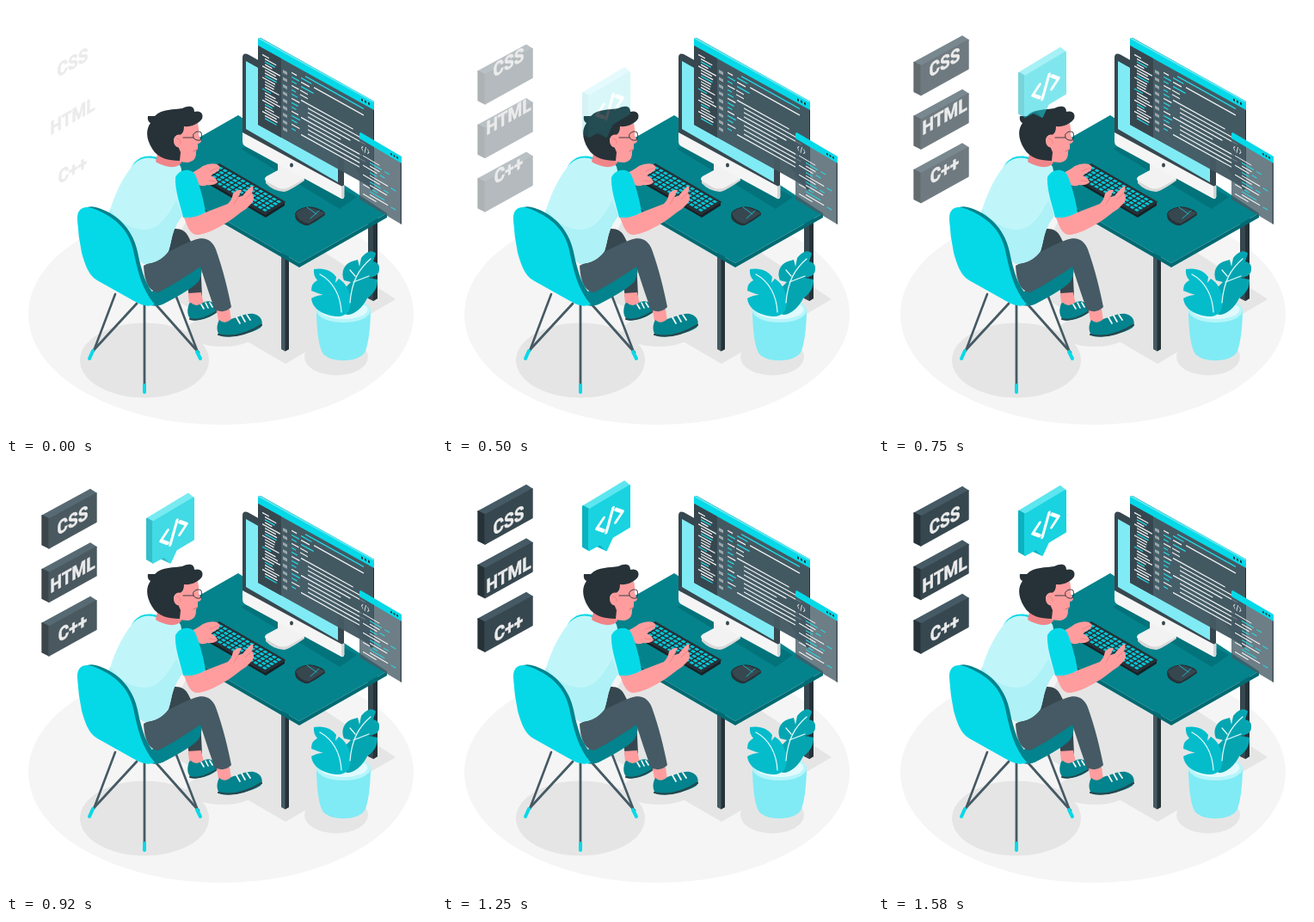
Write an HTML page that moves like this. It is 500 px wide and 500 px high and loops after 1620 ms.

```html
<!DOCTYPE html>
<html lang="en">
<head>
<meta charset="utf-8">
<title>Developer at work</title>
<style>
html, body { margin: 0; width: 100%; height: 100%; overflow: hidden; background: #fff; }
svg { display: block; width: 100%; height: 100%; }
.tag { font: 700 22px Roboto, Arial, sans-serif; fill: #ebebeb; stroke: #ebebeb; stroke-width: .6; text-anchor: middle; }
.line { fill: none; stroke-linecap: round; stroke-linejoin: round; }
</style>
</head>
<body>
<svg viewBox="0 0 500 500">
  <defs>
    <g id="slab" stroke-width="1.4" stroke-linejoin="round">
      <path d="M42 57L98 26.500L105 31L50 61Z" fill="#455a64" stroke="#455a64"/>
      <path d="M42 57L50 61V95L42 91Z" fill="#263238" stroke="#263238"/>
      <path d="M50 61L105 31V64.500L50 95Z" fill="#37474f" stroke="#37474f"/>
    </g>
  </defs>

  <!-- floor and shadows -->
  <ellipse cx="250" cy="358.500" rx="224" ry="128.500" fill="#f5f5f5"/>
  <g fill="#e5e5e5">
    <path d="M170 326L325 416L453 341L300 240L220 230Z"/>
    <ellipse cx="161" cy="412" rx="75" ry="43.500"/>
    <ellipse cx="384" cy="408" rx="37" ry="21.500"/>
    <ellipse cx="252" cy="378" rx="42" ry="18"/>
  </g>

  <!-- desk -->
  <path d="M421 240H432V340L427 343L421 340Z" fill="#37474f"/>
  <path d="M427 240H432V340L427 343Z" fill="#263238"/>
  <path d="M320 285H329V399L324.500 401.500L320 399Z" fill="#455a64"/>
  <path d="M324.500 285H329V399L324.500 401.500Z" fill="#263238"/>
  <path d="M172 201L341 299L443 241V246L341 304L172 206Z" fill="#006a72"/>
  <path d="M270 127L443 241L341 299L172 201V183Z" fill="#04838c"/>
  <path d="M273 166L292 158L408 222L388 236Z" fill="#02737b"/>

  <!-- monitor -->
  <path d="M302 201L302 206Q310 215 323 216Q328 216 347 203V198Z" fill="#d8d8d8"/>
  <path d="M303 198L316 191V178L334 187V192L345 196Q349 199 345 202L329 211Q322 214 315 211L303 204Q299 201 303 198Z" fill="#f2f2f2"/>
  <path d="M275 60Q275 54 281 56L393 119V214L275 150Z" fill="#37474f"/>
  <path d="M279 64L386 124V205L279 143Z" fill="#80ebf5"/>
  <path d="M275 147L393 211V222Q393 226 388 223L278 163Q275 161 275 158Z" fill="#f5f5f5"/>
  <path d="M390 210L393.500 208V222L390 224Z" fill="#d5d5d5"/>
  <ellipse cx="332" cy="185" rx="2" ry="2.500" fill="#37474f"/>

  <!-- keyboard and mouse -->
  <path d="M228 199L301 242L324 228V232L302 246L228 203Z" fill="#172126"/>
  <path d="M248 184L324 228L301 242L228 199Z" fill="#263238" stroke="#263238" stroke-width="2" stroke-linejoin="round"/>
  <g id="keys" transform="matrix(.866 .5 -.82 .5 248 184)" fill="#05c8d8"/>
  <path d="M336 243Q336 238 344 235Q354 231 364 236Q372 239 371 243Q362 250 352 255Q346 256 340 251Q336 248 336 243Z" fill="#263238"/>
  <path d="M337 241Q345 233 357 235L371 241L352 253Q340 251 337 241Z" fill="#37474f"/>
  <path class="line" d="M350 234L361 242M354 247L364 238" stroke="#17bfcc" stroke-width=".9"/>

  <!-- windows -->
  <path d="M293 38L296 37L428 111V212L425 214Z" fill="#263238"/>
  <g transform="matrix(1 .555 0 1 293 38)">
    <path d="M0 0H134V100H0Z" fill="#455a64" opacity=".97"/>
    <path d="M0 0L2.500 -2.300H135V8H0Z" fill="#05d9e8"/>
    <path d="M0 0L2.500 -2.300H135L134 0Z" fill="#5de8f2"/>
    <path d="M0 8H27V100H0Z" fill="#37474f"/>
    <path d="M120 4h2m2 0h2m2 0h2" stroke="#263238" stroke-width="2.600"/>
    <g id="code"/>
  </g>
  <g transform="matrix(1 .59 0 1 411 148)">
    <path d="M0 0H49V77H0Z" fill="#455a64" opacity=".78"/>
    <path d="M0 0L1.500 -1.800H49V6H0Z" fill="#05d9e8"/>
    <path d="M36 2.500h2m1.500 0h2m1.500 0h2" stroke="#263238" stroke-width="2"/>
    <path d="M47.500 6H49V77H47.500Z" fill="#263238" opacity=".6"/>
    <path class="line" d="M4 13L2.500 15.500L4 18M7.500 12L6 19M9.500 13L11 15.500L9.500 18" stroke="#e6eaec" stroke-width=".8"/>
    <g id="notes"/>
  </g>

  <!-- plant -->
  <path d="M361 354C361 372 363 392 367 401C372 416 412 416 418 401C422 390 424 370 424 352Z" fill="#80ebf5"/>
  <ellipse cx="392.500" cy="354" rx="31.500" ry="14" fill="#b5f5fa"/>
  <ellipse cx="392.500" cy="353" rx="28" ry="11" fill="#e0fafd"/>
  <path d="M394 350C390 338 392 330 397 325L401 321L393 319C389 310 393 300 402 297L409 295L411 303L413 293C419 285 427 283 430 288L427 297Q435 299 434 306C434 312 430 315 421 316L432 318C432 328 428 334 420 340C414 352 402 362 394 358Z" fill="#04a5b1"/>
  <path d="M358 306C370 304 379 308 384 315L383 322L387 317C398 324 404 340 399 354C393 364 380 361 374 359C364 356 356 350 355 340Q362 336 369 336Q362 334 355 331Q355 322 362 319Q357 313 358 306Z" fill="#05bccb"/>
  <path class="line" d="M365 312C380 320 389 336 390 356M424 294C410 306 402 320 400 345M406 314L400 307M404 321L422 314" stroke="#e6fcfe" stroke-width="1.200"/>

  <!-- far chair legs -->
  <path class="line" d="M127 335L102 401M198 338L222 400" stroke="#455a64" stroke-width="2.600"/>

  <!-- far leg -->
  <path d="M186 265C192 256 207 257 212 268L226 296L228 337L213 340L208 300L188 292Z" fill="#37474f"/>
  <path d="M212 334L227 333L230 347Q221 353 213 346Z" fill="#ff9d9e"/>
  <path d="M213 346C210 354 211 360 215 365C224 367 239 362 244 357Q246 352 243 347C238 342 233 343 229 345Q221 351 215 345Z" fill="#02838d"/>
  <path class="line" d="M214 364Q226 367 244 356" stroke="#27464d" stroke-width="2"/>
  <path class="line" d="M227 347L230 352M232 345L235 351M237 345L240 350" stroke="#fff" stroke-width="1.600"/>

  <!-- seat and near leg -->
  <path d="M168 333L226 298Q230 309 224 320Q217 329 182 347Q174 350 168 346Z" fill="#02838d"/>
  <path d="M160 302C175 294 197 280 219 272C232 267 240 273 244 283C252 305 258 330 262 350Q255 358 244 356C238 340 232 322 226 303C213 312 190 327 177 333C167 332 161 322 160 302Z" fill="#455a64"/>
  <path d="M245 354Q254 357 260 352L262 367Q254 371 247 366Z" fill="#ff9d9e"/>
  <path d="M248 365C244 372 245 381 250 384C262 386 285 381 296 374C300 368 297 360 288 358C278 357 270 362 262 364Q254 371 248 365Z" fill="#02838d"/>
  <path class="line" d="M247 382Q270 388 297 371" stroke="#27464d" stroke-width="2.200"/>
  <path class="line" d="M268 362L272 369M274 360L278 367M280 359L284 365" stroke="#fff" stroke-width="1.700"/>

  <!-- far arm and body -->
  <path d="M214 195Q224 190 229 186Q238 182 245 184Q252 187 246 192L238 197Q247 201 245 206Q240 209 234 208Q226 212 220 204Z" fill="#ff9d9e"/>
  <path class="line" d="M237 192L247 188M236 203L244 204" stroke="#e77e83" stroke-width=".8"/>
  <path d="M146 187C152 176 163 172 176 176L180 188L150 194Z" fill="#05d9e8"/>
  <path d="M176 179C165 174 154 177 146 187C134 202 124 224 119 245C132 250 142 264 147 280Q152 294 160 300Q179 299 189 285C194 270 192 261 205 244L199 205Q208 191 201 184Z" fill="#c0f6fa"/>
  <path d="M121 236C140 262 166 266 180 252Q190 242 198 226L205 244C192 261 194 270 189 285Q179 299 160 300Q152 294 147 280C142 264 132 250 119 245Z" fill="#aef1f7"/>
  <path d="M197 199C202 189 215 188 220 196C226 210 230 227 232 240Q220 248 206 246C203 232 196 214 197 199Z" fill="#05d9e8"/>
  <path d="M207 246Q220 247 232 240L258 230Q263 225 264 218Q269 213 274 214L270 222L275 221Q280 214 286 209Q289 211 286 217Q291 225 284 231Q280 236 273 240C262 249 242 263 224 266C214 267 211 256 207 246Z" fill="#ff9d9e"/>
  <path class="line" d="M270 222L265 231M286 217L278 225" stroke="#e77e83" stroke-width=".8"/>

  <!-- head -->
  <path d="M176 172L203 166L204 182Q201 188 190 187Q180 185 174 181Z" fill="#f08589"/>
  <path d="M196 145L222 133Q225 143 224 150L227 157Q226 160 223 160L223 166L221 169Q222 180 212 182Q205 182 199 180Z" fill="#ff9d9e"/>
  <path d="M165 128Q169 128 173 128C182 119 195 121 205 119C213 115 219 116 219 123C226 121 230 125 228 131C224 137 215 141 207 140Q207 148 202 150C194 149 193 160 200 163L203 170L202 180C190 180 176 177 170 166C162 153 163 143 168 136Q164 134 165 128Z" fill="#263238"/>
  <ellipse cx="201" cy="157" rx="6" ry="7.500" fill="#ff9d9e"/>
  <path class="line" d="M199 154Q204 155 203 160" stroke="#e77e83" stroke-width=".8"/>
  <path class="line" d="M206 153L218 153M218 149Q222 144 227 147Q229 152 226 156Q220 157 218 153Z" stroke="#263238" stroke-width=".9"/>
  <path class="line" d="M218 169Q220 168 222 167" stroke="#c55e66" stroke-width=".8"/>

  <!-- chair back and near legs -->
  <path class="line" d="M152 346L103 399M161 346V442M175 348L224 403" stroke="#455a64" stroke-width="2.800"/>
  <path class="line" d="M101 401L97 410M161 441V449M222 402L226 410" stroke="#05d9e8" stroke-width="4"/>
  <path d="M90 236Q97 231 108 235C132 243 148 262 153 286C158 311 164 327 174 337L226 305Q228 315 221 322L180 347Q170 352 158 342Z" fill="#02838d"/>
  <path d="M83 249C82 235 91 231 103 236C128 246 143 261 148 284C153 308 158 330 173 347C164 351 156 347 147 342L106 319C96 313 92 301 88 287Q84 268 83 249Z" fill="#05d9e8"/>

  <!-- floating pieces -->
  <g id="slabs">
    <use href="#slab"/><use href="#slab" y="62.500"/><use href="#slab" y="125"/>
  </g>
  <g id="tags"></g>
  <g id="bubble" stroke-linejoin="round" stroke-width="2">
    <path d="M164 55L212 26L218 31L171 59Z" fill="#5ce6ef" stroke="#5ce6ef"/>
    <path d="M164 55L171 59V106L164 102Z" fill="#0bb2bf" stroke="#0bb2bf"/>
    <path d="M178 101L184 98L191 107Z" fill="#0bb2bf"/>
    <path d="M171 59L218 31V79L198 91L191 106L184 99L171 106Z" fill="#19d3e0" stroke="#19d3e0"/>
    <path class="line" d="M-7 -6.500L-15 1L-7 8.500M4 -12L-4 12M7 -8.500L15 -1L7 6.500" transform="matrix(1 -.577 0 1 195 71)" stroke="#fff" stroke-width="3.600"/>
  </g>
</svg>
<script>
const LOOP = 1620, STEP = LOOP / 39;
const $ = id => document.getElementById(id);
const bar = (x, y, w, color, h = 1.4) =>
  `<rect x="${x}" y="${y}" width="${w}" height="${h}" rx=".5" fill="${color}"/>`;
const CYAN = '#23dbe8', WHITE = '#f4f6f7', GREY = '#9aa7ad';

let seed = 11;
const rand = () => (seed = seed * 16807 % 2147483647) / 2147483647;

function drawKeys() {
  let out = '';
  for (let r = 0; r < 5; r++)
    for (let c = 0; c < 14; c++)
      out += `<rect x="${3 + c * 6}" y="${2 + r * 4.9}" width="4.3" height="3.4" rx=".6"/>`;
  $('keys').innerHTML = out;
}

function drawCode() {
  let out = '';
  for (let i = 0; i < 23; i++) {
    const x = 5 + (i % 4 ? 3 : 0);
    out += bar(x, 15 + i * 3.3, 8 + rand() * (20 - x), i % 5 == 2 ? CYAN : WHITE);
  }
  for (let i = 0; i < 9; i++) out += bar(29, 20 + i * 8.3, 5, GREY, 3.6);
  for (let i = 0; i < 14; i++) {
    const y = 17 + i * 5;
    out += bar(39, y, 5 + rand() * 5, i % 3 ? CYAN : WHITE);
    if (i < 3) out += bar(50, y, 10 + rand() * 8, i % 2 ? WHITE : CYAN);
    else if (i < 5) out += bar(49, y, 9, WHITE);
  }
  out += bar(55, 12.5, 68, CYAN) + bar(65, 20, 58, WHITE);
  for (let i = 0; i < 9; i++)
    out += bar(i % 4 ? 58 : 50, 43 + i * 5, 42 + rand() * 26, WHITE);
  $('code').innerHTML = out;

  out = '';
  for (let i = 0; i < 13; i++) {
    const x = i % 3 ? 12 : 4, w = 8 + rand() * 14;
    out += bar(x, 23 + i * 3.7, w, i % 3 == 1 ? CYAN : WHITE, 1.2);
    if (i % 2) out += bar(x + w + 3, 23 + i * 3.7, 6, CYAN, 1.2);
  }
  $('notes').innerHTML = out;
}

function drawTags() {
  $('tags').innerHTML = ['CSS', 'HTML', 'C++'].map((s, i) =>
    `<text class="tag" transform="matrix(.866 -.5 0 1 77.500 ${73 + i * 62.5})">${s}</text>`).join('');
}

const curve = (s, a, b) => 3 * (1 - s) * (1 - s) * s * a + 3 * (1 - s) * s * s * b + s * s * s;

function ease(x, x1, y1, x2, y2) {
  if (x <= 0) return 0;
  if (x >= 1) return 1;
  let lo = 0, hi = 1;
  for (let i = 0; i < 24; i++) {
    const mid = (lo + hi) / 2;
    if (curve(mid, x1, x2) < x) lo = mid; else hi = mid;
  }
  return curve(lo, y1, y2);
}

function rise(el, p, distance, fade = 1) {
  const alpha = Math.max(0, Math.min(1, p)) ** fade;
  el.setAttribute('transform', `translate(0 ${(distance * (1 - p)).toFixed(2)})`);
  el.setAttribute('opacity', alpha.toFixed(3));
}

function render(now) {
  const n = Math.floor((now % LOOP) / STEP + 0.01), t = n * STEP;
  rise($('slabs'), n < 4 ? 0 : ease(t / 1540, .36, -.01, .5, 1.38), 30);
  rise($('bubble'), ease((t - 180) / 1400, .325, 0, .508, 1.5), 60, 1.25);
}

drawKeys();
drawCode();
drawTags();
let start;
function tick(now) {
  start ??= now;
  render(now - start);
  requestAnimationFrame(tick);
}
render(0);
requestAnimationFrame(tick);
</script>
</body>
</html>
```
